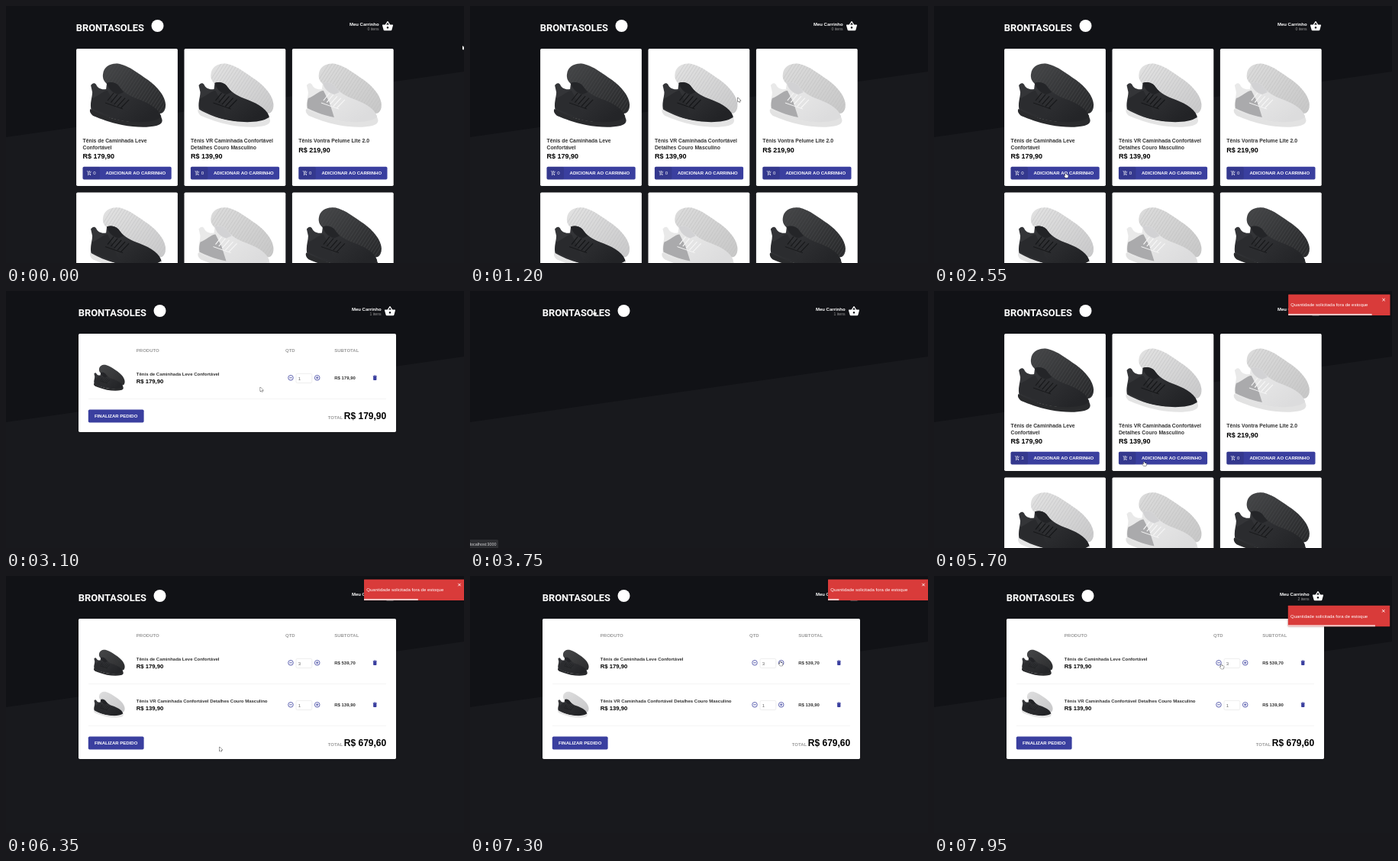
An HTML page with a canvas that plays this animation: 600 by 337 pixels, repeating every 8 s.

```html
<!DOCTYPE html>
<html lang="pt-BR">
<head>
<meta charset="utf-8">
<title>Loja de tênis</title>
<style>
html, body { margin: 0; width: 100%; height: 100%; overflow: hidden; background: #111216; }
canvas { display: block; width: 600px; height: 337px; }
</style>
</head>
<body>
<canvas id="stage"></canvas>
<script>
const W = 600, H = 337, LOOP = 8000, UNIT = 0.428;
const BLUE = '#3a3f9f', GRAY = '#999';
const SANS = '"Liberation Sans", Arial, sans-serif';
const stage = document.getElementById('stage');
const ctx = stage.getContext('2d');
const dpr = window.devicePixelRatio || 1;
stage.width = Math.round(W * dpr);
stage.height = Math.round(H * dpr);

// Page changes
const TO_CART = 2600, TO_BLANK = 3700, TO_HOME = 3900, TO_CART2 = 6200;

const ICONS = {
  basket: 'M17.21 9l-4.38-6.56c-.19-.28-.51-.42-.83-.42-.32 0-.64.14-.83.43L6.79 9H2c-.55 0-1 .45-1 1 0 .09.01.18.04.27l2.54 9.27c.23.84 1 1.46 1.92 1.46h13c.92 0 1.69-.62 1.93-1.46l2.54-9.27L23 10c0-.55-.45-1-1-1h-4.79zM9 9l3-4.4L15 9H9zm3 8c-1.1 0-2-.9-2-2s.9-2 2-2 2 .9 2 2-.9 2-2 2z',
  add: 'M11 9h2V6h3V4h-3V1h-2v3H8v2h3v3zM7 18a2 2 0 1 0 0 4a2 2 0 1 0 0-4zM17 18a2 2 0 1 0 0 4a2 2 0 1 0 0-4zM7.17 14.75l.03-.12.9-1.63h7.45c.75 0 1.41-.41 1.75-1.03l3.86-7.01L19.42 4h-.01l-3.86 7H8.53L4.27 2H1v2h2l3.6 7.59-1.35 2.45C4.5 15.4 5.5 17 7 17h12v-2H7.42c-.13 0-.25-.11-.25-.25z',
  bin: 'M6 19c0 1.1.9 2 2 2h8c1.1 0 2-.9 2-2V7H6v12zM19 4h-3.5l-1-1h-5l-1 1H5v2h14V4z',
  arrow: 'M0 0V8.2L1.9 6.5L3.1 9.1L4.5 8.5L3.3 6H5.9Z',
  hand: 'M1 .3C.3 .3 0 .8 0 1.3V5.2L-1.1 4.2C-1.8 3.7-2.4 4.4-2 5L.3 8.4H4.6L5.4 6V3.7C5.3 2.9 4.3 2.9 4.2 3.4C4 2.7 3 2.7 2.9 3.1C2.7 2.5 1.9 2.5 1.8 2.9V1.2C1.8 .7 1.5 .3 1 .3Z'
};
for (const k in ICONS) ICONS[k] = new Path2D(ICONS[k]);

const SHOE = {
  back: new Path2D('M127 89C128 79 138 74 149 76C162 79 174 89 186 97C198 106 208 117 209 129C209 139 204 143 197 140L182 134C165 121 145 117 133 103C128 99 126 94 127 89Z'),
  upper: new Path2D('M112 138C109 128 113 120 113 113L111 104C113 101 116 100 118 103C120 108 125 110 131 109L132 101C136 99 143 100 147 104C152 112 160 117 170 121C184 126 199 133 203 144C205 151 198 154 188 154C160 154 130 147 112 138Z'),
  sole: new Path2D('M110.500 135C124 143 140 149 157 151C173 153 193 153 203 146C206 150 205 155 197 157C184 160 168 159 152 156C137 153 124 148 114 144C110 141 109 137 110.500 135Z'),
  heel: new Path2D('M113 121C120 119 127 111 133 111L141 127L147 146C131 143 118 137 112 134C111 129 112 124 113 121Z'),
  tongue: new Path2D('M132 101C137 99 143 100 147 104L154 113L147 116C140 114 134 109 132 101Z')
};

const LOOKS = [
  { back: ['#434446', '#2a2b2d'], rib: '#4b4c4e', upper: ['#343538', '#242528'], sole: '#2a2b2d', heel: '#2b2c2f', lace: '#18191b', tongue: '#242528' },
  { back: ['#e0e0e0', '#cbcbcc'], rib: '#c2c2c3', upper: ['#343538', '#222326'], sole: '#e4e4e4', heel: '#292a2d', lace: '#151618', tongue: '#222326' },
  { back: ['#dadada', '#c9c9c9'], rib: '#bfbfbf', upper: ['#e9e9e9', '#dcdcdd'], sole: '#e2e2e2', heel: '#aaaaac', lace: '#f6f6f6', tongue: '#d2d2d4' }
];

const PRODUCTS = [
  { lines: ['Tênis de Caminhada Leve', 'Confortável'], price: 'R$ 179,90', look: 0 },
  { lines: ['Tênis VR Caminhada Confortável', 'Detalhes Couro Masculino'], price: 'R$ 139,90', look: 1 },
  { lines: ['Tênis Vontra Pelume Lite 2.0'], price: 'R$ 219,90', look: 2 }
];

// Pointer path: time, x, y
const PATH = [
  [0, 598, 52], [600, 472, 92], [1200, 351, 120], [1850, 240, 186], [2400, 172, 219.5],
  [2720, 172, 219.5], [3050, 340, 140], [3500, 162, 26], [3760, 162, 26], [4300, 161.5, 220],
  [5350, 161.5, 220], [5750, 279.5, 224], [6400, 279.5, 224], [7250, 406, 112],
  [7660, 406, 112], [7900, 376, 116], [8000, 376, 116]
];

function text(str, x, y, size, color, opt = {}) {
  ctx.font = `${opt.weight || 'bold'} ${size}px ${opt.family || SANS}`;
  ctx.textAlign = opt.align || 'left';
  ctx.fillStyle = color;
  ctx.fillText(str, x, y);
}

function box(x, y, w, h, color, r = 1.7) {
  ctx.beginPath();
  ctx.roundRect(x, y, w, h, r);
  ctx.fillStyle = color;
  ctx.fill();
}

function line(x1, y1, x2, y2, color, width) {
  ctx.beginPath();
  ctx.moveTo(x1, y1);
  ctx.lineTo(x2, y2);
  ctx.strokeStyle = color;
  ctx.lineWidth = width;
  ctx.stroke();
}

function icon(name, x, y, size, color) {
  ctx.save();
  ctx.translate(x, y);
  ctx.scale(size / 24, size / 24);
  ctx.fillStyle = color;
  ctx.fill(ICONS[name]);
  ctx.restore();
}

function shade(x1, y1, x2, y2, [a, b]) {
  const g = ctx.createLinearGradient(x1, y1, x2, y2);
  g.addColorStop(0, a);
  g.addColorStop(1, b);
  return g;
}

// Shoe pair in the coordinates of the first card
function shoes(dx, dy, scale, look) {
  const c = LOOKS[look];
  const fill = (path, color) => { ctx.fillStyle = color; ctx.fill(path); };
  ctx.save();
  ctx.translate(dx, dy);
  ctx.scale(scale, scale);
  fill(SHOE.back, shade(140, 75, 195, 140, c.back));
  ctx.save();
  ctx.clip(SHOE.back);
  for (let i = 0; i < 28; i++) {
    const x = 122 + i * 3.3, y = 104 + i * 1.7;
    line(x, y, x + 22, y - 34, c.rib, 0.6);
  }
  ctx.restore();
  fill(SHOE.upper, shade(135, 105, 175, 155, c.upper));
  fill(SHOE.heel, c.heel);
  fill(SHOE.tongue, c.tongue);
  for (let i = 0; i < 5; i++) {
    line(133 + i * 4.3, 124 + i * 2.5, 141 + i * 5, 114 + i * 2.2, c.lace, 1.2);
  }
  line(130, 127, 153, 135, c.lace, 1);
  fill(SHOE.sole, c.sole);
  ctx.restore();
}

function background() {
  ctx.fillStyle = '#18191d';
  ctx.fillRect(0, 0, W, H);
  ctx.beginPath();
  ctx.moveTo(0, 0);
  ctx.lineTo(W, 0);
  ctx.lineTo(W, 86);
  ctx.lineTo(0, 172);
  ctx.fillStyle = '#111216';
  ctx.fill();
}

function header(dx, items) {
  text('BRONTASOLES', 91.7 + dx, 33.3, 12.9, '#fff', { family: 'Roboto, sans-serif' });
  ctx.beginPath();
  ctx.arc(198.5 + dx, 26, 8, 0, Math.PI * 2);
  ctx.fillStyle = '#fff';
  ctx.fill();
  text('Meu Carrinho', 488.6 + dx, 25.6, 6, '#fff', { align: 'right' });
  text(items + ' itens', 488.6 + dx, 32.4, 5.14, GRAY, { align: 'right', weight: 'normal' });
  icon('basket', 492.3 + dx, 18.7, 15.4, '#fff');
}

function card(x, y, p, count) {
  box(x, y, 132.8, 180, '#fff');
  shoes(x - 92, y - 56, 1, p.look);
  p.lines.forEach((s, i) => text(s, x + 8.4, y + 123.3 + i * 8.2, 6.85, '#333'));
  text(p.price, x + 8.4, y + 136 + (p.lines.length - 1) * 8.4, 9, '#000');
  box(x + 8.4, y + 154.7, 116.2, 16.8, BLUE);
  box(x + 8.4, y + 154.7, 22.5, 16.8, 'rgba(0,0,0,.1)');
  icon('add', x + 13.6, y + 159.6, 6.85, '#fff');
  text(count, x + 22.2, y + 165.3, 6, '#fff', { weight: 'normal' });
  text('ADICIONAR AO CARRINHO', x + 38.5, y + 165.2, 6, '#fff');
}

function home(count) {
  const order = [0, 1, 2, 1, 2, 0];
  order.forEach((n, i) => {
    card(92.1 + (i % 3) * 141.4, 56 + (i > 2 ? 188.6 : 0), PRODUCTS[n], i ? 0 : count);
  });
}

function stepper(x, y, plus) {
  ctx.beginPath();
  ctx.arc(x, y, 3.3, 0, Math.PI * 2);
  ctx.strokeStyle = BLUE;
  ctx.lineWidth = 0.8;
  ctx.stroke();
  line(x - 1.8, y, x + 1.8, y, BLUE, 0.8);
  if (plus) line(x, y - 1.8, x, y + 1.8, BLUE, 0.8);
}

function cartRow(y, p, qty, subtotal) {
  shoes(115 - 110 * 0.41, y + 39.5 - 75 * 0.41, 0.41, p.look);
  text(p.lines.join(' '), 170.8, y + 53.9, 6, '#333');
  text(p.price, 170.8, y + 64, 7.7, '#000');
  stepper(373, y + 56.8, false);
  stepper(407.7, y + 56.8, true);
  ctx.beginPath();
  ctx.roundRect(380, y + 51.4, 20.8, 12.2, 1.7);
  ctx.strokeStyle = '#ddd';
  ctx.lineWidth = 0.5;
  ctx.stroke();
  text(qty, 382.8, y + 59.9, 6, '#666', { weight: 'normal' });
  text(subtotal, 430.2, y + 59.1, 6, '#333');
  icon('bin', 479, y + 52.5, 8.56, BLUE);
  line(108, y + 84.5, 498, y + 84.5, '#eee', 0.6);
}

function cart(rows, total) {
  const end = rows.length * 55;
  box(95, 56, 416, 74 + end, '#fff');
  text('PRODUTO', 170.8, 80.3, 6, GRAY);
  text('QTD', 366, 80.3, 6, GRAY);
  text('SUBTOTAL', 430.2, 80.3, 6, GRAY);
  rows.forEach((r, i) => cartRow(57 + i * 55, ...r));
  box(107.8, 100.5 + end, 72.8, 17, BLUE);
  text('FINALIZAR PEDIDO', 144.2, 111.2 + end, 6, '#fff', { align: 'center' });
  text('TOTAL', 421.7, 113 + end, 6, GRAY);
  text(total, 498.2, 113 + end, 12, '#000', { align: 'right' });
}

function statusBubble() {
  box(-4, 326, 41, 15, '#2d2e32', 1.5);
  text('localhost:3000', 34.6, 333.6, 5.4, '#d4d4d6', { align: 'right', weight: 'normal' });
}

// Toast offset and opacity: bounce in, rest, bounce out
const LIFE = 2240, BOUNCE = 520;
function toastPose(age) {
  if (age < BOUNCE) {
    const keys = [[0, 3000], [0.6, -25], [0.75, 10], [0.9, -5], [1, 0]];
    const p = age / BOUNCE;
    const i = keys.findIndex(k => p < k[0]);
    const [a, from] = keys[i - 1], [b, to] = keys[i];
    const s = (p - a) / (b - a);
    return [from + (to - from) * (1 - (1 - s) ** 3), i === 1 ? s : 1];
  }
  const q = (age - LIFE) / BOUNCE;
  if (q <= 0) return [0, 1];
  if (q < 0.2) return [-20 * Math.sin(q / 0.2 * Math.PI / 2), 1];
  const s = (q - 0.2) / 0.8, e = s * s * (3 - 2 * s);
  return [-20 + 2020 * e, 1 - e];
}

function toast(t, start, y, baseX) {
  const age = t - start;
  if (age < 0 || age >= LIFE + BOUNCE) return;
  const [shift, alpha] = toastPose(age);
  const x = baseX + shift * UNIT;
  if (x > W) return;
  ctx.save();
  ctx.globalAlpha = alpha;
  ctx.save();
  ctx.shadowColor = 'rgba(0,0,0,.25)';
  ctx.shadowBlur = 3 * dpr;
  box(x, y, 133.4, 27.5, '#d93b3a', 0.5);
  ctx.restore();
  text('Quantidade solicitada fora de estoque', x + 3.2, y + 15.8, 6, '#fff', { weight: 'normal' });
  const cx = x + 125, cy = y + 7;
  line(cx - 1.7, cy - 1.7, cx + 1.7, cy + 1.7, '#fff', 0.9);
  line(cx - 1.7, cy + 1.7, cx + 1.7, cy - 1.7, '#fff', 0.9);
  const left = Math.max(0, 1 - age / LIFE);
  ctx.fillStyle = 'rgba(255,255,255,.7)';
  ctx.fillRect(x, y + 25.4, 133.4 * left, 2.1);
  ctx.restore();
}

function slope(i, k) {
  const a = PATH[i - 1], b = PATH[i], c = PATH[i + 1];
  if (!a || !c) return 0;
  const still = (p, q) => p[1] === q[1] && p[2] === q[2];
  if (still(a, b) || still(b, c)) return 0;
  return (c[k] - a[k]) / (c[0] - a[0]);
}

function pointerAt(t) {
  const i = Math.max(0, PATH.findIndex(p => p[0] > t) - 1);
  const a = PATH[i], b = PATH[i + 1], d = b[0] - a[0], s = (t - a[0]) / d;
  return [1, 2].map(k =>
    a[k] + (b[k] - a[k]) * s * s * (3 - 2 * s) +
    slope(i, k) * d * s * (1 - s) ** 2 - slope(i + 1, k) * d * s * s * (1 - s));
}

function isLink(x, y, page) {
  if (x > 92 && x < 213 && y > 17 && y < 35) return true;
  if (page === 'home') return y > 210 && y < 228 && x > 100 && x < 499 && (x - 100.5) % 141.4 < 116.2;
  return page === 'cart2' && [373, 407.7].some(cx => Math.hypot(x - cx, y - 113.8) < 4.4);
}

function pointer(t, page) {
  const [x, y] = pointerAt(t);
  const path = ICONS[isLink(x, y, page) ? 'hand' : 'arrow'];
  ctx.save();
  ctx.translate(x, y);
  ctx.scale(0.68, 0.68);
  ctx.lineJoin = 'round';
  ctx.lineWidth = 1.3;
  ctx.strokeStyle = '#222';
  ctx.stroke(path);
  ctx.fillStyle = '#fff';
  ctx.fill(path);
  ctx.restore();
}

function pageAt(t) {
  if (t < TO_CART) return 'home';
  if (t < TO_BLANK) return 'cart1';
  if (t < TO_HOME) return 'blank';
  return t < TO_CART2 ? 'home' : 'cart2';
}

function draw(t) {
  const page = pageAt(t);
  ctx.setTransform(dpr, 0, 0, dpr, 0, 0);
  background();
  header(page === 'home' ? 0 : 3, t < TO_CART ? 0 : t < TO_CART2 ? 1 : 2);
  if (page === 'home') home(t < TO_CART ? 0 : t < 4500 ? 1 : t < 4750 ? 2 : 3);
  if (page === 'cart1') cart([[PRODUCTS[0], 1, 'R$ 179,90']], 'R$ 179,90');
  if (page === 'cart2') {
    cart([[PRODUCTS[0], 3, 'R$ 539,70'], [PRODUCTS[1], 1, 'R$ 139,90']], 'R$ 679,60');
  }
  if (t >= 3600 && t < 4000) statusBubble();
  const toastX = page === 'home' ? 462.2 : 469;
  toast(t, 5300, 4.5, toastX);
  toast(t, 7628, 38.8, toastX);
  pointer(t, page);
}

const begin = performance.now();
function tick() {
  draw((performance.now() - begin) % LOOP);
  requestAnimationFrame(tick);
}
tick();
</script>
</body>
</html>
```
